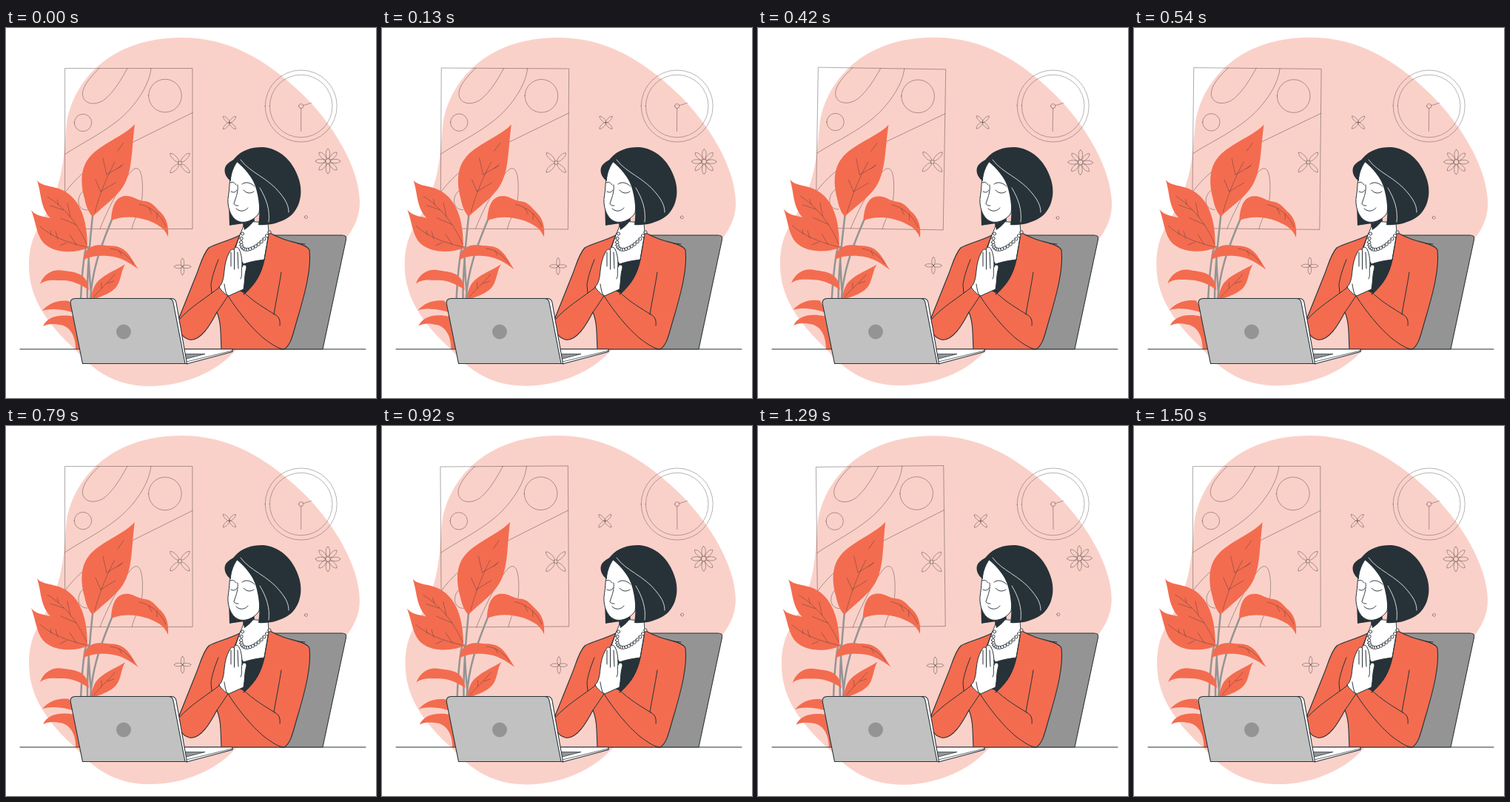
Recreate the animation shown at these times as an HTML page with a canvas. Size 500 by 500 pixels, loop 1.54 s.

```html
<!DOCTYPE html>
<html lang="en">
<head>
<meta charset="utf-8">
<title>Calm at the desk</title>
<style>
html, body { margin: 0; width: 100%; height: 100%; overflow: hidden; background: #fff; }
canvas { display: block; width: 500px; height: 500px; }
</style>
</head>
<body>
<canvas id="stage"></canvas>
<script>
const canvas = document.getElementById('stage');
const ctx = canvas.getContext('2d');
const ratio = window.devicePixelRatio || 1;
canvas.width = canvas.height = 500 * ratio;

const LOOP = 1540, STEPS = 37;
const INK = '#263238', CORAL = '#f36c4f', PINK = '#fad1c9', GREY = '#949494';
const FAINT = 'rgba(48,40,40,.44)', VEIN = 'rgba(38,50,56,.45)';

function shape(d, fill, stroke, width = 1) {
  const path = new Path2D(d);
  if (fill) { ctx.fillStyle = fill; ctx.fill(path); }
  if (stroke) { ctx.strokeStyle = stroke; ctx.lineWidth = width; ctx.stroke(path); }
}
const line = (d, color = INK, width = 1) => shape(d, null, color, width);

function circle(x, y, r, fill, stroke, width) {
  shape(`M${x - r} ${y}a${r} ${r} 0 1 0 ${2 * r} 0a${r} ${r} 0 1 0 ${-2 * r} 0Z`, fill, stroke, width);
}

// Rotate a group about its own centre.
function sway(x, y, angle, draw) {
  ctx.save();
  ctx.translate(x, y);
  ctx.rotate(angle);
  ctx.translate(-x, -y);
  draw();
  ctx.restore();
}

function blob() {
  shape('M238 13C299 13 350 41 399 88C440 127 478 188 478 236C478 272 450 295 424 325C388 366 342 404 308 438C284 464 242 484 194 484C150 484 120 465 94 435C58 402 31 367 31 321C31 282 46 268 58 244C80 198 78 165 82 128C91 74 138 13 238 13Z', PINK);
}

function picture() {
  line('M80 54.5H252V271.5H80Z', FAINT, .9);
  circle(215, 91.5, 22.3, null, FAINT, .9);
  circle(104, 128, 11.7, null, FAINT, .9);
  line('M126 54.5C112 68 101 82 104 93C108 105 124 104 134 96C147 85 156 69 164 54.5' +
    'M196 54.5C194 78 173 108 150 126C126 145 98 158 80 170.5' +
    'M252 114.5L168 156C140 170 105 188 80 222' +
    'M112 216C102 219 97 228 98 236C99 243 104 246 110 246' +
    'M127 271.5C136 248 150 222 160 206C168 194 173 188 178 190C185 194 185 215 184 229C182 248 174 254 170 271.5', FAINT, .9);
}

function flower(x, y, petals, length, width, turn, core) {
  const half = (length - core) / 2;
  ctx.strokeStyle = FAINT;
  ctx.lineWidth = .9;
  for (let i = 0; i < petals; i++) {
    const a = turn + i * 2 * Math.PI / petals, reach = core + half;
    ctx.beginPath();
    ctx.ellipse(x + reach * Math.cos(a), y + reach * Math.sin(a), half, width, a, 0, 2 * Math.PI);
    ctx.stroke();
  }
  if (core) circle(x, y, core, null, FAINT, .9);
}

function flowers() {
  flower(235, 182.5, 4, 18.5, 2.7, Math.PI / 4, 2.4);
  flower(302, 128, 4, 12, 2, Math.PI / 4, 0);
  flower(238.5, 322.5, 4, 11.3, 2.2, 0, 0);
  flower(435, 180, 8, 16.8, 2.7, 0, 3.3);
  circle(405.5, 255.5, 2, null, FAINT, .9);
}

function clock() {
  circle(398.7, 105.5, 48.5, null, FAINT, .8);
  circle(398.7, 105.5, 42.3, null, FAINT, .8);
  circle(398.7, 105.5, 3.1, null, FAINT, .9);
  line('M401.7 104.7L412.5 101.3M398.7 108.5V139.5', FAINT, .9);
}

const leaves = [
  ['M50 403C56 390 72 386 92 390L104 440H94C96 415 85 402 72 401C63 399 56 400 50 403Z', ''],
  ['M49 382C58 372 70 367 85 369L95 386C80 380 62 378 49 382Z', ''],
  ['M46 346C52 330 66 325 78 328C92 330 110 330 112 354C102 347 90 341 76 341C64 341 55 339 46 346Z', ''],
  ['M161 319C150 327 128 334 120 348C116 356 115 362 115 368C130 362 146 358 152 345C156 336 156 328 161 319Z',
    'M119 363C127 353 136 346 147 333M129 352V344M137 345L146 342'],
  ['M105 313C106 297 118 292 132 293.5C143 295 152 293 161 301C169 308 173 318 179 326C165 316 156 311 145 309C130 307 118 307 105 313Z',
    'M141 298C153 299 163 306 172 318M153 301L156 307'],
  ['M142 260C143 243 147 228 161 227C172 226 176 233 188 234C198 235 203 244 209 249C218 258 220 269 219 282C213 268 203 265 192 260C176 255 160 253 142 260Z',
    'M180 238C195 241 209 252 216 268M193 243L197 251M204 250V258'],
  ['M34 246C43 258 63 254 80 264C96 273 106 285 111 297C95 304 70 305 55 294C41 284 41 263 34 246Z',
    'M46 268C60 281 82 290 109 296M61 280L60 274M70 285L67 275M82 290L73 294M95 293L86 279'],
  ['M42 206C50 216 68 212 83 223C100 235 110 258 110 296C94 282 72 273 59 256C46 241 48 224 42 206Z',
    'M56 228C76 240 96 262 109 292M71 239L69 232M78 246L60 240M87 255L83 237M95 266L74 257'],
  ['M174 130C160 146 124 158 111 177C99 193 102 216 106 230C108 241 112 250 117 255C132 240 154 226 162 207C171 188 170 160 174 130Z',
    'M120 249C125 230 134 205 147 181M136 198L131 176M136 198L157 186M128 221L121 205M128 221L148 209M151 166L159 155M151 190L158 184']
];

function plant() {
  line('M117 254C114 285 109 325 110 368M143 259C127 298 116 328 114 368M111 296C112 320 113 345 116 368M108 297C103 320 102 345 101 368', GREY, 2.5);
  for (const [outline, veins] of leaves) {
    shape(outline, CORAL);
    if (veins) line(veins, VEIN, .8);
  }
}

function chair() {
  shape('M350 280H454Q461 280 459.5 286L428 434H370Z', GREY, INK, 1.1);
}

function body() {
  shape('M316 280C300 288 282 292 274 297C266 305 262 322 257 334L233 394C232 411 239 420 250 421.5C264 421 275 403 285 384C291 398 290 416 291 434H376C386 428 388 411 395 389C404 358 413 325 410 300C406 292 388 290 374 285C366 282 360 279 355 276Z', CORAL, INK, 1.1);
  shape('M311 300L350 311C345 333 337 346 323 359L306 350Z', INK);
  shape('M316 279C319 274 321 268 322 261L354 263L355 277C353 291 351 300 349 313C340 314 329 316 321 319L309 301Z', '#fff', INK, .9);
  line('M316 280C313 287 311 294 308 300M355 277C353 291 351 302 349 313C345 333 337 346 321 360', INK, 1.1);
  line('M287 313C282 325 278 338 277 347L278 358M289 350C273 363 250 376 234 394M372 330C369 350 365 368 362 387M319 355C334 370 352 380 363 387C369 390 371 395 370 402M394 291L404 292');
  line('M300 362C312 381 331 405 349 420C359 427 368 434 376 434M300 362C295 369 291 376 285 384');
}

function necklace() {
  const at = (a, b, c, d, t) => {
    const u = 1 - t;
    return a * u ** 3 + 3 * b * u * u * t + 3 * c * u * t * t + d * t ** 3;
  };
  for (let i = 0; i <= 15; i++) {
    const t = i / 15;
    circle(at(319.5, 310, 340, 356, t), at(278, 313, 300, 276, t), 2.1, '#fff', INK, .9);
  }
}

function hands() {
  shape('M288 350C293 345 294 338 295 328C296 318 298 310 302 303C304 299 307 298 308 300C309 295 313 295 315 299C318 305 319 312 319 323C321 318 325 320 325 324C322 333 323 342 321 353L301 362C296 360 291 355 288 350Z', '#fff', INK, 1);
  line('M304 303V322M308.5 300V326M313 303L314 325M319 322C317 330 320 334 317 339M295 346C296 353 297 358 299 361');
}

function head() {
  shape('M301 238L302 267C312 265 325 264 336 261L334 246Z', INK);
  shape('M320 264L335 261C331 266 327 270 322 273Z', INK);
  shape('M312 181C306 190 303 200 302 212C302 222 299 230 300 237C301 248 306 259 316 262C326 264 337 258 342 250L346 214L326 183Z', '#fff', INK, 1);
  shape('M304 207C294 200 293 188 300 183C303 180 307 179 309 176C318 165 332 161 346 161C368 162 388 178 396 205C403 228 394 249 380 257C368 264 355 267 341 266C344 248 342 230 337 214C333 202 323 190 312 181C307 188 304 197 304 207Z', INK);
  line('M317 178C330 196 354 202 371 224C379 234 382 241 382 249M343 216C352 231 357 246 355 262', '#fff', .8);
  line('M303 209C306 207 309 209 311 212M319 211C324 207 331 209 336 214M304 221C307 223 311 222 312 219M321 219C325 224 331 224 335 221M313 212C314 220 312 226 308 237C309 240 311 240 314 240M311 244C316 249 323 248 327 243', INK, .95);
}

function laptop() {
  shape('M238 434H306V437.5L244 454Z', '#fff', INK, 1.1);
  shape('M241 440.5H269L244 447Z', GREY, INK, .7);
  line('M244 451L306 436', INK, .7);
  shape('M94 365.5H223Q229 365.5 230 371L244.5 453.5H104Z', '#fff', INK, 1.1);
  shape('M94 365.5H219Q225 365.5 226 371L242 453.5H103.5L87.3 373Q86 365.5 94 365.5Z', '#c1c1c1', INK, 1.1);
  circle(159, 410.5, 10, GREY);
}

// Linear swing in degrees: 0, +1 at a quarter, -1 at three quarters, back to 0.
function swing(p) {
  if (p < .25) return 4 * p;
  return p < .75 ? 2 - 4 * p : 4 * p - 4;
}

function draw() {
  const step = Math.floor((performance.now() % LOOP + 2) / LOOP * STEPS) % STEPS;
  const angle = swing(step / STEPS) * Math.PI / 180;
  ctx.setTransform(ratio, 0, 0, ratio, 0, 0);
  ctx.lineJoin = ctx.lineCap = 'round';
  ctx.fillStyle = '#fff';
  ctx.fillRect(0, 0, 500, 500);

  sway(254.5, 248.5, angle, blob);
  sway(166, 163, angle, picture);
  sway(336.5, 226, angle, flowers);
  sway(398.7, 105.5, angle, clock);
  ctx.save();
  ctx.beginPath();
  ctx.rect(0, 0, 500, 434);
  ctx.clip();
  sway(127, 282, angle, plant);
  ctx.restore();

  line('M19 434H486', INK, 1.1);
  chair();
  body();
  necklace();
  hands();
  head();
  laptop();
  requestAnimationFrame(draw);
}
draw();
</script>
</body>
</html>
```
